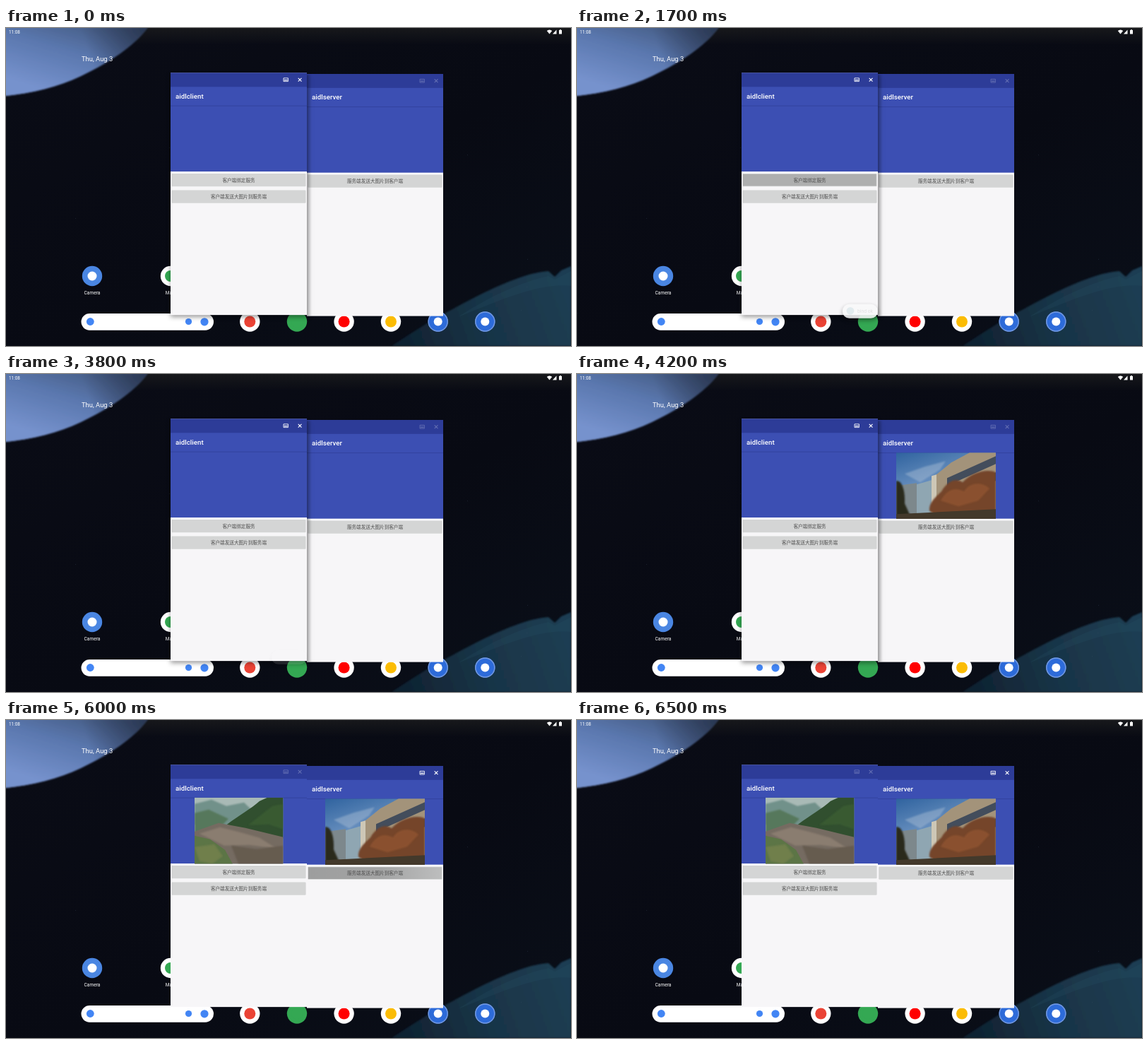
These frames come from a looping animation (800x450 px, 6600 ms). An HTML page:

```html
<!DOCTYPE html>
<html lang="zh">
<head>
<meta charset="utf-8">
<title>Two windows exchanging pictures</title>
<style>
html, body { margin: 0; width: 100%; height: 100%; overflow: hidden; background: #090b14; }
svg { display: block; }
#stage { width: 100%; height: 100%; }
text { font-family: Roboto, "Noto Sans CJK SC", "Noto Sans CJK", sans-serif; }
.label { font-size: 6.6px; fill: #fff; text-anchor: middle; }
.title { font-size: 9.7px; font-weight: 500; fill: #fff; }
.button { font-family: "Noto Sans CJK SC", "Noto Sans CJK", sans-serif; font-size: 6.6px; font-weight: 500; fill: #505050; text-anchor: middle; }
.raised { filter: drop-shadow(0 3px 3px rgba(0, 0, 0, .38)); }
</style>
</head>
<body>
<svg id="stage" viewBox="0 0 800 450">
  <defs>
    <linearGradient id="night" x2="1" y2="1">
      <stop stop-color="#0a0c16"/><stop offset=".55" stop-color="#080a13"/><stop offset="1" stop-color="#0a0f19"/>
    </linearGradient>
    <linearGradient id="scrim" x2="0" y2="1">
      <stop stop-color="#17181b"/><stop offset="1" stop-color="#17181b" stop-opacity="0"/>
    </linearGradient>
    <linearGradient id="planet" gradientUnits="userSpaceOnUse" x1="95" y1="-20" x2="62" y2="90">
      <stop stop-color="#43597f"/><stop offset=".45" stop-color="#5a77ae"/><stop offset="1" stop-color="#7692cd"/>
    </linearGradient>
    <linearGradient id="dusk" gradientUnits="userSpaceOnUse" x1="115" y1="30" x2="205" y2="0">
      <stop stop-color="#1f2940" stop-opacity="0"/><stop offset="1" stop-color="#1f2940" stop-opacity=".75"/>
    </linearGradient>
    <linearGradient id="sea" gradientUnits="userSpaceOnUse" x1="560" y1="450" x2="790" y2="370">
      <stop stop-color="#0f2231"/><stop offset=".5" stop-color="#193447"/><stop offset="1" stop-color="#1d3d52"/>
    </linearGradient>
    <linearGradient id="sky" x2=".5" y2="1">
      <stop stop-color="#2f639f"/><stop offset=".5" stop-color="#6990bf"/><stop offset="1" stop-color="#a9bccf"/>
    </linearGradient>
    <linearGradient id="press" gradientUnits="userSpaceOnUse" x1="0" y1="0" x2="189" y2="0">
      <stop stop-opacity=".26"/><stop offset=".55" stop-opacity=".23"/><stop offset="1" stop-opacity=".11"/>
    </linearGradient>
    <filter id="soft"><feGaussianBlur stdDeviation="1"/></filter>
  </defs>

  <rect width="800" height="450" fill="url(#night)"/>
  <rect width="800" height="24" fill="url(#scrim)"/>
  <g filter="url(#soft)">
    <path id="globe" d="M-9 -9H206L200 0C183 24 146 49 106 68C72 84 36 93 -9 97Z" fill="url(#planet)"/>
    <use href="#globe" style="fill: url(#dusk)"/>
    <path d="M-9 -9H206L200 0C183 24 146 49 106 68C72 84 36 93 -9 97Z" fill="url(#dusk)"/>
  </g>
  <path d="M546 450C566 437 588 422 612 409C648 389 692 365 728 353C745 347 758 345 768 344L777 352L786 343L800 337V450Z" fill="url(#sea)" filter="url(#soft)"/>
  <path d="M640 409C690 376 735 358 768 351L777 356L800 344V365C755 360 700 385 640 409Z" fill="#2b566b" opacity=".2"/>
  <g id="specks"></g>

  <text x="4" y="8" font-size="6.4" fill="#fff">11:08</text>
  <g fill="#fff">
    <path d="M765.8 4Q769.5 1 773.2 4L769.5 8.4Z"/>
    <path d="M774 8.4H779.5V2.6Z"/>
    <path d="M783 3H784V2.3H786V3H787V8.4H783Z"/>
  </g>
  <text x="107" y="47" font-size="9.4" fill="#fff">Thu, Aug 3</text>

  <rect x="106.5" y="404" width="187.5" height="23.7" rx="11.85" fill="#fff"/>
  <g id="icons"></g>
  <text class="label" x="122" y="377">Camera</text>
  <text class="label" x="234" y="377">Maps</text>

  <g id="windows"></g>

  <g id="toast">
    <rect id="plate" class="raised" x="376" y="390.7" width="49.7" height="20" rx="9.5" fill="#f9f9fa"/>
    <g id="message">
      <circle cx="387" cy="400.3" r="5.4" fill="#458fa6"/>
      <text x="397" y="402.7" font-size="6.8" fill="#333">bind ok</text>
    </g>
  </g>
</svg>

<script>
const LOOP = 6600, STEP = 100;
const $ = id => document.getElementById(id);
const clamp = v => Math.max(0, Math.min(1, v));
const ramp = (t, from, to) => clamp((t - from) / (to - from));
const disc = (x, y, r, fill) => `<circle cx="${x}" cy="${y}" r="${r}" fill="${fill}"/>`;

// Launcher: a plate with one plain dot
const apps = [
  [122, 351, "#4a86e2", "#fff", 6.5], [233, 351, "#fff", "#34a853", 8],
  [345.3, 415.5, "#fff", "#ea4335", 8], [412, 415.5, "#34a853", "#34a853", 8],
  [478.6, 415.5, "#fff", "#f00", 8], [545, 415.5, "#fff", "#fbbc04", 8],
  [611.7, 415.5, "#2d6bd9", "#fff", 6], [678.3, 415.5, "#2d6bd9", "#fff", 6]
];
$("icons").innerHTML = apps.map(([x, y, plate, dot, r]) =>
  disc(x, y, 14.2, plate) + disc(x, y, r, dot)).join("") +
  [611.7, 678.3].map(x => `<circle cx="${x}" cy="415.5" r="13.5" fill="none" stroke="#7499df" stroke-width="1.5"/>`).join("") +
  disc(119.3, 415.5, 5.4, "#4285f4") + disc(258.5, 415.5, 4.6, "#4285f4") + disc(281, 415.8, 5.6, "#4285f4");

let seed = 7;
const rand = () => (seed = seed * 16807 % 2147483647) / 2147483647;
$("specks").innerHTML = Array.from({ length: 16 }, () =>
  disc(rand() * 800, 100 + rand() * 330, .35, "#46566f")).join("");

const campus = `
  <rect width="141" height="94" fill="url(#sky)"/>
  <path d="M12 30L40 20L70 12L62 24L34 42Z" fill="#b4c5d8" opacity=".4" filter="url(#soft)"/>
  <path d="M53 34L78 14L104 0H141V94H53Z" fill="#a3937a"/>
  <path d="M72 36L141 5V16L72 47ZM72 54L141 28V40L72 64Z" fill="#434d5c"/>
  <path d="M0 47L29 43V94H0Z" fill="#7d888c"/>
  <path d="M29 45L50 39V94H29Z" fill="#8fa6b2"/>
  <path d="M50 33L57 31V94H50Z" fill="#cdc7b6"/>
  <path d="M0 40C9 39 13 56 12 72L22 94H0Z" fill="#29291f" filter="url(#soft)"/>
  <path d="M47 82C46 70 57 62 64 55C72 41 84 35 94 42C106 28 130 22 141 28V82C124 93 103 78 86 88C71 93 54 90 47 82Z" fill="#74442b" filter="url(#soft)"/>
  <path d="M63 68C74 48 87 50 96 55C105 40 124 42 132 51L116 68L88 76Z" fill="#945632" opacity=".7" filter="url(#soft)"/>
  <path d="M0 87L60 84L141 80V94H0Z" fill="#43392b"/>`;

const valley = `
  <rect width="125.5" height="94" fill="#a9bab6"/>
  <path d="M0 9L24 3L45 12L70 7L94 30L40 44L0 38Z" fill="#71918a" filter="url(#soft)"/>
  <path d="M0 22L20 17L48 30L30 48L0 50Z" fill="#56785c" filter="url(#soft)"/>
  <path d="M46 38C63 25 80 16 92 5L103 0H125.5V58L90 49L64 46Z" fill="#314f2f"/>
  <path d="M76 39L110 12L125.5 9V45L105 38Z" fill="#3f6335" opacity=".6" filter="url(#soft)"/>
  <path d="M0 48L34 36L72 43L125.5 56V94H0Z" fill="#756b61"/>
  <path d="M7 51L36 42L64 49L92 57L116 72L77 67L42 68Z" fill="#8a7d70" filter="url(#soft)"/>
  <path d="M0 54L22 59L43 74L54 94H0Z" fill="#5c7546"/>
  <path d="M0 70L28 66L40 83L25 94L7 90Z" fill="#7d8550" opacity=".6" filter="url(#soft)"/>
  <path d="M52 68L88 73L125.5 68V94H62Z" fill="#665c50" filter="url(#soft)"/>`;

const WIDTH = 193, HEIGHT = 342.6;

function button(id, y, text, fill) {
  return `<rect x="1.2" y="${y}" width="190.4" height="18.3" rx="1.2" fill="#d4d5d5"/>
    <svg x="2" y="${y + .8}" width="188.8" height="16.7"><circle id="${id}" cx="95" cy="8" fill="${fill}"/></svg>
    <text class="button" x="96.5" y="${y + 11.7}">${text}</text>`;
}

function makeWindow(name, x, y, title, photo, photoX, photoW, buttons) {
  return `<g id="${name}" transform="translate(${x} ${y})">
    <rect width="${WIDTH}" height="${HEIGHT}" fill="#f7f6f8"/>
    <rect width="${WIDTH}" height="140" fill="#3c4fb3"/>
    <rect width="${WIDTH}" height="19.8" fill="#2d3c98"/>
    <rect y="46.2" width="${WIDTH}" height=".9" fill="#31429c"/>
    <rect y="139.7" width="${WIDTH}" height="2.7" fill="#fff"/>
    <g id="${name}Controls" fill="none" stroke="#fff">
      <path d="M160 7.4H166.4V12.1H160Z" stroke-width=".9"/>
      <path d="M160.8 10.2H165.6" stroke-width="1.3"/>
      <path d="M180.7 7.4L185.5 12.2M185.5 7.4L180.7 12.2" stroke-width="1.1"/>
    </g>
    <text class="title" x="7.1" y="36.4">${title}</text>
    ${buttons}
    <svg id="${name}Photo" x="${photoX}" y="46.3" width="${photoW}" height="93.6">${photo}</svg>
    <linearGradient id="${name}Edge"><stop stop-opacity=".2"/><stop offset="1" stop-opacity="0"/></linearGradient>
    <rect id="${name}Shade" x="${WIDTH}" y="3" width="7" height="${HEIGHT - 2}" fill="url(#${name}Edge)"/>
  </g>`;
}

$("windows").innerHTML =
  makeWindow("server", 426, 65, "aidlserver", campus, 26, 141,
    button("reply", 142.5, "服务端发送大图片到客户端", "url(#press)")) +
  makeWindow("client", 233, 63.5, "aidlclient", valley, 34, 125.5,
    button("bind", 142.5, "客户端绑定服务", "rgba(0,0,0,.18)") +
    button("send", 166, "客户端发送大图片到服务端", "rgba(0,0,0,.18)"));
$("serverShade").remove();

const show = (id, on) => $(id).style.display = on ? "" : "none";
const fade = (id, value) => $(id).setAttribute("opacity", value);

function press(id, t, down, up, end) {
  $(id).setAttribute("r", 20 + 175 * ramp(t, down, down + 300));
  fade(id, t < down ? 0 : 1 - ramp(t, up, end));
}

let front = "client";
function raise(name) {
  if (name !== front) $("windows").append($(front = name));
}

function draw(time) {
  const t = Math.floor(time % LOOP / STEP) * STEP;

  press("bind", t, 1000, 1700, 2100);
  press("send", t, 3100, 3400, 3800);
  press("reply", t, 5600, 6000, 6500);

  const leaving = 1 - ramp(t, 3600, 3825);
  fade("plate", t < 1700 ? 0 : ramp(t, 1000, 1800) * leaving);
  fade("message", ramp(t, 1660, 2000) * (1 - ramp(t, 3600, 3800)));

  show("serverPhoto", t >= 4000);
  show("clientPhoto", t >= 6000);

  raise(t < 5500 ? "client" : "server");
  $("client").setAttribute("class", t < 5500 ? "raised" : "");
  show("clientShade", t < 5500);
  fade("clientControls", t < 5600 ? 1 : .25);
  fade("serverControls", t < 5600 ? .25 : 1);
}

const start = performance.now();
function tick() {
  draw(performance.now() - start);
  requestAnimationFrame(tick);
}
tick();
</script>
</body>
</html>
```
